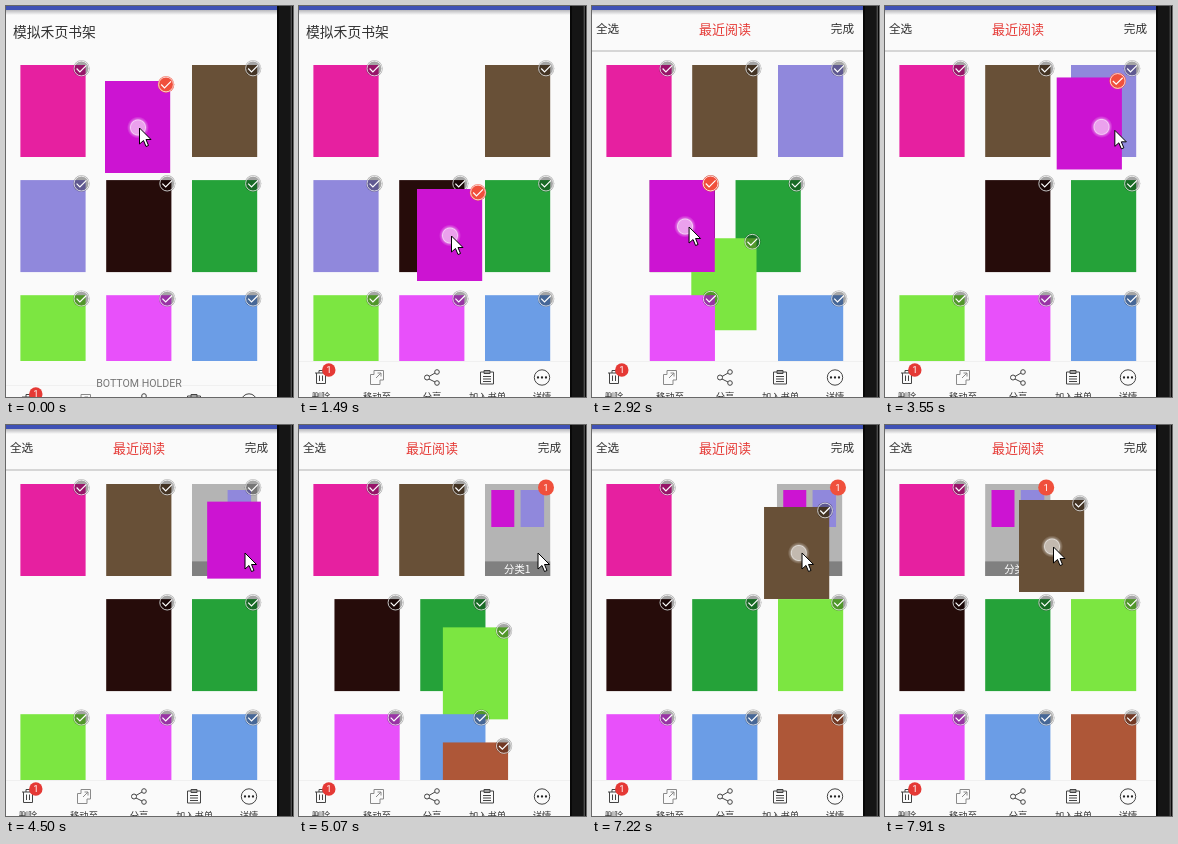
Write an HTML page that moves like this. It is 287 px wide and 391 px high and loops after 8000 ms.

```html
<!DOCTYPE html>
<html lang="zh">
<head>
<meta charset="utf-8">
<style>
html, body { margin: 0; width: 100%; height: 100%; overflow: hidden; background: #fafafa; }
svg { display: block; width: 287px; height: 391px; }
text { font-family: "Noto Sans CJK SC", "Noto Sans CJK", Roboto, sans-serif; }
.mid { text-anchor: middle; }
.num { font-family: Roboto, sans-serif; font-size: 9.5px; fill: #fff; text-anchor: middle; }
.icon { fill: none; stroke: #444; stroke-width: 1; }
.pale { stroke: #8a8a8a; }
.label { font-size: 9.3px; fill: #333; text-anchor: middle; }
</style>
</head>
<body>
<svg viewBox="0 0 287 391">
  <defs>
    <linearGradient id="shade" x2="0" y2="1">
      <stop stop-color="#b8b8bc"/><stop offset="1" stop-color="#fafafa"/>
    </linearGradient>
    <radialGradient id="glow">
      <stop offset=".6" stop-color="#fff" stop-opacity=".6"/>
      <stop offset=".68" stop-color="#fff" stop-opacity=".78"/>
      <stop offset=".78" stop-color="#fff" stop-opacity=".3"/>
      <stop offset="1" stop-color="#fff" stop-opacity="0"/>
    </radialGradient>
    <clipPath id="view"><path d="M0 46H271V355H0z"/></clipPath>
  </defs>
  <rect width="287" height="391" fill="#fafafa"/>
  <rect y="4" width="271" height="5" fill="url(#shade)"/>
  <rect width="271" height="4" fill="#3f51b5"/>
  <text id="title" x="7" y="31" font-size="13.8" fill="#333">模拟禾页书架</text>
  <g id="tools" fill="#333" font-size="11.6">
    <text x="4" y="27">全选</text>
    <text x="133" y="27.500" font-size="13" fill="#e53935" class="mid">最近阅读</text>
    <text x="238.800" y="27">完成</text>
    <rect y="44" width="271" height="2" fill="#d6d6d6"/>
  </g>
  <g id="list" clip-path="url(#view)"></g>
  <g id="bar">
    <rect y="355" width="271" height="60" fill="#fafafa"/>
    <rect y="355" width="271" height="1" fill="#f0f0f0"/>
    <path class="icon" d="M16 367H28M20 367V364.500H24V367M17.500 367V377.500H26.500V367M20.500 369.500V375M23.500 369.500V375"/>
    <path class="icon pale" d="M75 368.500V364.500H84.500V374H81M75 368.500H71.500V378.500H81V374M77 372L82 367M78.500 367H82V370.500"/>
    <path class="icon" d="M130 370.500L136 367M130 373L136 376"/>
    <g class="icon"><circle cx="128" cy="371.500" r="2.500"/><circle cx="138" cy="366" r="2.300"/><circle cx="138" cy="377" r="2.300"/></g>
    <path class="icon" d="M181.500 366H194.500V378H181.500zM185 364.500H191V367.500H185zM184 370.500H192M184 373H192M184 375.500H192"/>
    <circle class="icon" cx="243" cy="371.500" r="7.700"/>
    <path d="M239 371.500h0M243 371.500h0M247 371.500h0" stroke="#222" stroke-width="2.300" stroke-linecap="round"/>
    <circle cx="29.800" cy="364" r="6.700" fill="#e53935"/>
    <text class="num" x="29.800" y="367.400">1</text>
    <g class="label">
      <text x="22" y="394">删除</text><text x="78" y="394">移动至</text><text x="133" y="394">分享</text>
      <text x="188.500" y="394">加入书单</text><text x="243" y="394">详情</text>
    </g>
  </g>
  <text id="holder" x="133" y="380.500" class="mid" font-size="10.6" fill="#757575" style="font-family:Roboto,sans-serif">BOTTOM HOLDER</text>
  <g id="held"></g>
  <circle id="touch" r="11" fill="url(#glow)"/>
  <path id="cursor" d="M0 0V16L4 12.500L6.500 18.500L9 17.500L6.500 11.500H11.500z" fill="#fff" stroke="#000"/>
  <rect x="271" width="16" height="391" fill="#080808"/>
  <rect x="273" width="11" height="391" fill="#151515"/>
  <rect x="284.500" width="1.500" height="391" fill="#4c4c4c"/>
</svg>
<script>
const LOOP = 8000, W = 65.2, H = 92;
const GREY = 'rgba(0,0,0,.34)', RED = '#f0503c';
const PINK = 0, MAGENTA = 1, BROWN = 2, PURPLE = 3;
const colors = ['#e620a0', '#cc14d2', '#685037', '#9088dc', '#260c0a',
  '#25a239', '#7ce641', '#e850fa', '#6b9de6', '#ae5738'];

// Order of the cards on the shelf from a given time on
const orders = [[0, '0123456789'], [2470, '0234567189'], [2770, '0231456789'],
  [4870, '023456789'], [7200, '032456789']];

// Key points of the pointer: time, then the corner of the card it holds
const path = [[0, 99, 75], [700, 99, 75], [1220, 126, 181], [1490, 118, 183], [1770, 118, 183],
  [2010, 95, 236], [2280, 112, 288], [2440, 112, 288], [2620, 87, 205], [2800, 50, 174],
  [3040, 65, 174], [3550, 171.4, 71.4], [3640, 198, 78], [3820, 204.5, 81], [5400, 204.5, 81],
  [5730, 114, 71], [6910, 114, 71], [7220, 172, 82], [7610, 189, 77], [7910, 134, 75], [LOOP + 100, 134, 75]];

const $ = id => document.getElementById(id);
const ramp = (t, a, b) => Math.min(1, Math.max(0, (t - a) / (b - a)));
const ease = p => (1 - Math.cos(Math.PI * p)) / 2;
const mix = (a, b, p) => a.map((v, i) => v + (b[i] - v) * p);
const slot = i => [14.4 + 85.8 * (i % 3), 59 + 115.1 * Math.floor(i / 3)];

function pointer(t) {
  const i = path.findIndex(key => key[0] > t);
  const a = path[i - 1], b = path[i];
  return mix(a, b, ramp(t, a[0], b[0])).slice(1);
}

function place(id, t) {
  let pos;
  for (const [start, order] of orders) {
    if (t < start) break;
    const next = slot(order.indexOf(id));
    pos = pos ? mix(pos, next, ease(ramp(t, start, start + 300))) : next;
  }
  return pos;
}

const rect = (x, y, w, h, fill) =>
  `<rect x="${x}" y="${y}" width="${w}" height="${h}" fill="${fill}"/>`;
const at = ([x, y], body) => `<g transform="translate(${x} ${y})">${body}</g>`;
const badge = fill => at([61, 3.5], `<circle r="8.300" fill="${fill}"/>
  <g fill="none" stroke="#fff"><circle r="7.400" stroke-opacity=".85" stroke-width=".9"/>
  <path d="M-4.800 0L-1.500 3.300L5 -3.200" stroke-width="1.200"/></g>`);
const card = id => rect(0, 0, W, H, colors[id]) + badge(id === MAGENTA ? RED : GREY);

// The purple card shrinks into a folder, then the magenta one joins it
function folder(t) {
  const p = ramp(t, 4200, 4500);
  if (!p) return card(PURPLE);
  return rect(0, 0, W, H, '#b4b4b4') + rect(0, 77.4, W, 14.6, '#808080') +
    '<text x="32.300" y="89" class="mid" font-size="10.400" fill="#fff">分类1</text>' +
    rect(...mix([0, 0, W, H], [35.6, 6, 23.5, 37], p), colors[PURPLE]) +
    (t >= 4770 ? rect(6.3, 6, 23, 37, colors[MAGENTA]) : '') +
    (t >= 4900 ? `<circle cx="61" cy="3.500" r="8" fill="${RED}"/><text class="num" x="61" y="7">1</text>`
      : badge(GREY));
}

function held(t) {
  const pos = pointer(t);
  if (t < 4400) return at(pos, card(MAGENTA));
  if (t < 4770) return rect(...mix([...pos, W, H], [192.3, 65, 23, 37], ramp(t, 4400, 4770)), colors[MAGENTA]);
  if (t < 6560) return '';
  return at(mix(slot(1), pos, ramp(t, 6560, 6830)), card(BROWN));
}

function draw(t) {
  $('list').innerHTML = colors.map((_, id) =>
    id === MAGENTA || id === BROWN && t >= 6560 ? '' :
      at(place(id, t), id === PURPLE ? folder(t) : card(id))).join('');
  $('held').innerHTML = held(t);

  const show = (id, on) => $(id).setAttribute('visibility', on ? 'visible' : 'hidden');
  show('title', t < 2530);
  show('tools', t >= 2530);
  show('holder', t < 150);
  show('touch', t < 4260 || t >= 6010);

  const move = (id, x, y) => $(id).setAttribute('transform', `translate(${x} ${y})`);
  move('bar', 0, 24 * (1 - ramp(t, 120, 260)));
  // The arrow runs a little ahead of the touch dot, the dot ahead of the card
  const dot = pointer(t + 40), tip = pointer(t + 80);
  move('touch', dot[0] + 33, dot[1] + 46.5);
  move('cursor', tip[0] + 34.5, tip[1] + 47);
}

const begin = performance.now();
function frame() {
  draw((performance.now() - begin) % LOOP);
  requestAnimationFrame(frame);
}
frame();
</script>
</body>
</html>
```
